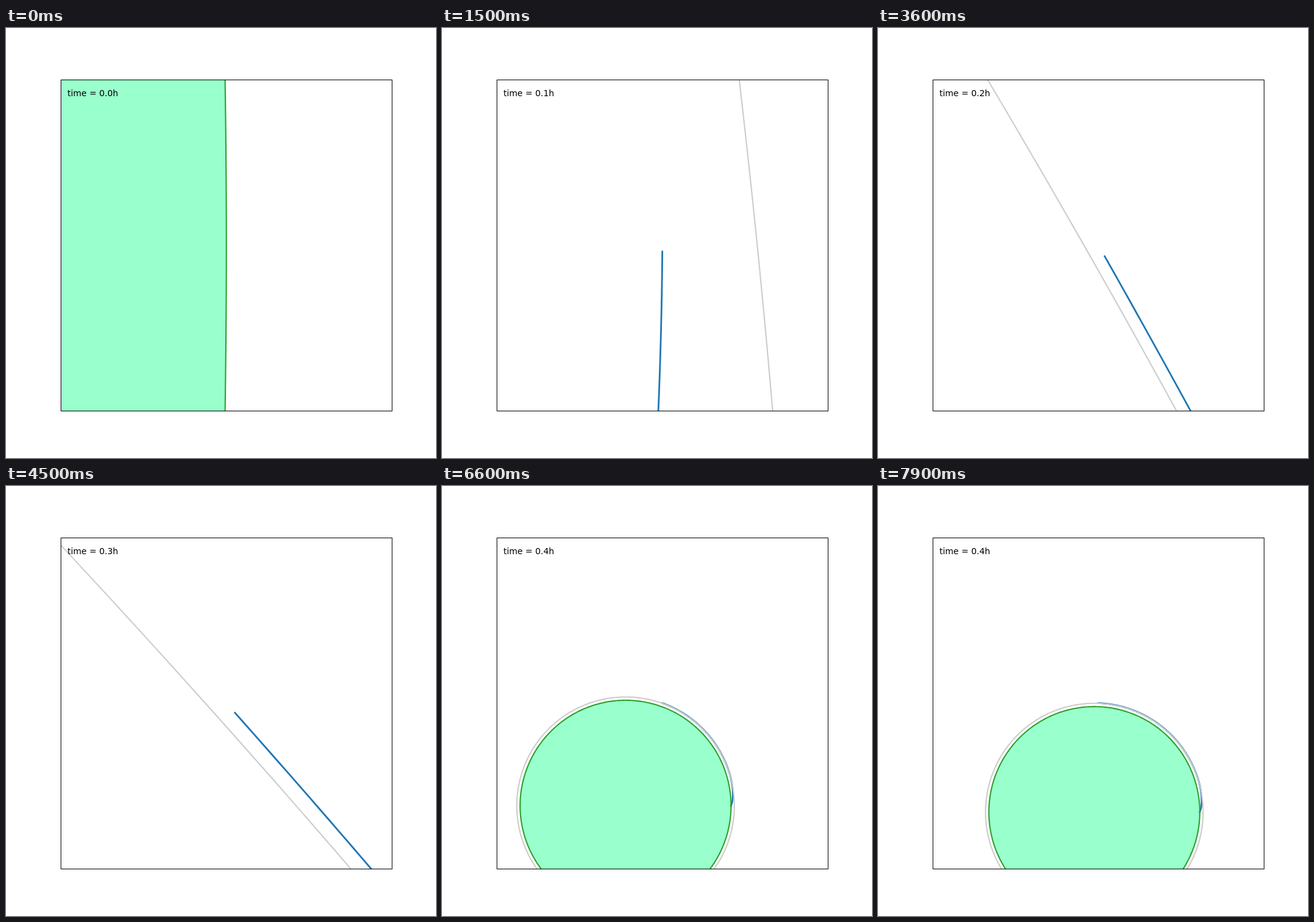
Animation, 700 px wide and 700 px high, one loop 8000 ms. Source, as an HTML page with a canvas:

```html
<!DOCTYPE html>
<html lang="en">
<head>
<meta charset="utf-8">
<title>Ascent to orbit</title>
<style>
  html, body { margin: 0; width: 100%; height: 100%; overflow: hidden; background: #fff; }
  canvas { display: block; width: 700px; height: 700px; }
</style>
</head>
<body>
<canvas id="stage" width="700" height="700"></canvas>
<script>
const ctx = document.getElementById('stage').getContext('2d');

const STEP = 100, COUNT = 80, LOOP = STEP * COUNT;
const PLANET = 6371, ORBIT = 6571;          // km
const CX = 358.75, CY = 353.5, HALF = 269.5; // plot centre and half width, px
const WIDE_FROM = 65;
const LAG = 0.05;                            // one second, in steps of 20 s

// step, altitude (km), climb per step, angle (deg), turn per step
const knots = [
  [0, 0, 0, 0, 0.08],
  [9, 77.3, 13.8, 2.2, 0.53],
  [15, 143, 8.4, 5.82, 0.675],
  [18, 167, 7, 8.03, 0.8],
  [27, 204, 1.3, 17.54, 1.346],
  [36, 207.6, 0.25, 29.66, 1.347],
  [45, 209.5, 0.2, 41.8, 1.352],
  [54, 211.3, 0.18, 54.02, 1.356],
  [66, 212.9, 0.1, 70.27, 1.354],
  [79, 213.5, 0, 87.87, 1.354]
];

function hermite(a, b, col, s) {
  const len = b[0] - a[0], u = (s - a[0]) / len, u2 = u * u, u3 = u2 * u;
  return a[col] * (2 * u3 - 3 * u2 + 1) + b[col] * (3 * u2 - 2 * u3)
    + len * (a[col + 1] * (u3 - 2 * u2 + u) + b[col + 1] * (u3 - u2));
}

function rocket(s) {
  let i = 0;
  while (i < knots.length - 2 && s > knots[i + 1][0]) i++;
  const r = PLANET + hermite(knots[i], knots[i + 1], 1, s);
  const angle = hermite(knots[i], knots[i + 1], 3, s) * Math.PI / 180;
  return { x: r * Math.cos(angle), y: r * Math.sin(angle), angle };
}

function draw(n) {
  const wide = n >= WIDE_FROM;
  const scale = HALF / (wide ? 10000 : 100);
  const eye = rocket(n);
  const sx = x => CX + (x - eye.x) * scale;
  const sy = y => CY - (y - eye.y) * scale;

  function arc(r) {
    const span = wide ? Math.PI : 0.06, parts = wide ? 360 : 60;
    for (let i = 0; i <= parts; i++) {
      const a = eye.angle + span * (2 * i / parts - 1);
      ctx.lineTo(sx(r * Math.cos(a)), sy(r * Math.sin(a)));
    }
  }

  function line(color, width, path) {
    ctx.strokeStyle = color;
    ctx.lineWidth = width;
    ctx.beginPath();
    path();
    ctx.stroke();
  }

  ctx.fillStyle = '#fff';
  ctx.fillRect(0, 0, 700, 700);

  ctx.save();
  ctx.beginPath();
  ctx.rect(CX - HALF, CY - HALF, 2 * HALF, 2 * HALF);
  ctx.clip();
  ctx.lineJoin = 'round';
  ctx.lineCap = 'square';

  ctx.fillStyle = '#99ffcc';
  ctx.beginPath();
  if (!wide) ctx.moveTo(sx(0), sy(0));
  arc(PLANET);
  ctx.fill();

  if (n > 0) {
    line('#1f77b4', 2.78, () => {
      for (let k = 0; k < n * 20; k++) {
        const p = rocket(k * LAG);
        ctx.lineTo(sx(p.x), sy(p.y));
      }
    });
  }
  line('#cccccc', 2.08, () => arc(ORBIT));
  line('#2ca02c', 2.08, () => arc(PLANET));
  ctx.restore();

  ctx.strokeStyle = '#000';
  ctx.lineWidth = 1;
  ctx.strokeRect(89.5, 84.5, 539, 539);

  const hours = (n * 20 + 1) / 3600;
  ctx.fillStyle = '#000';
  ctx.font = '13.89px "DejaVu Sans", sans-serif';
  ctx.fillText('time = ' + hours.toFixed(1) + 'h', 100, 111);
}

const start = performance.now();
let shown = -1;
function tick() {
  const n = Math.floor(((performance.now() - start) % LOOP) / STEP);
  if (n !== shown) draw(shown = n);
  requestAnimationFrame(tick);
}
tick();
</script>
</body>
</html>
```
